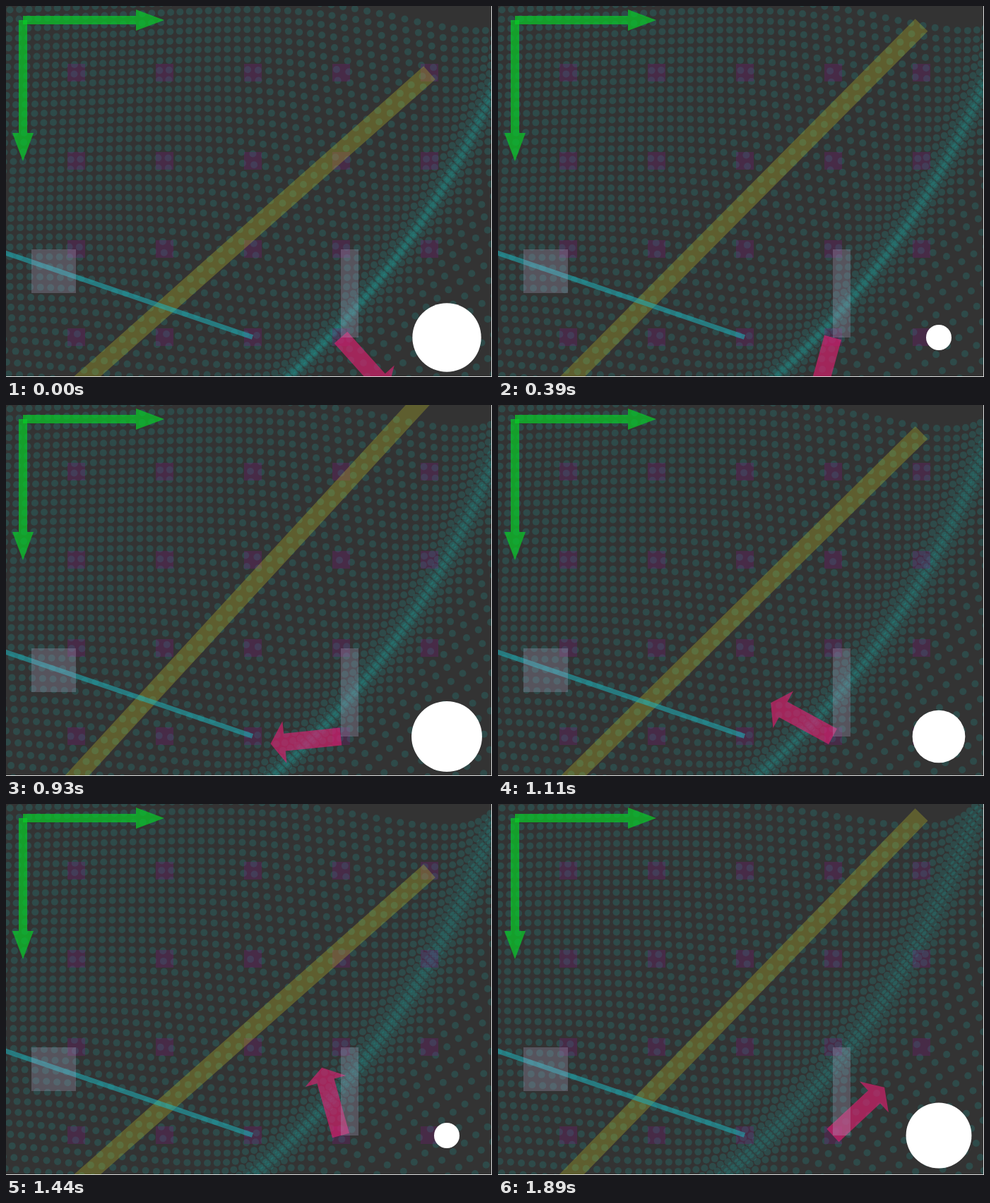
Animation of 688x526 px, one loop 1990 ms. Source, as an HTML page with a canvas:

```html
<!DOCTYPE html>
<html lang="en">
<head>
<meta charset="utf-8">
<title>Shapes over a waving dot field</title>
<style>
  html, body { margin: 0; width: 100%; height: 100%; overflow: hidden; background: #ddd; }
  canvas { display: block; }
</style>
</head>
<body>
<canvas id="stage" width="688" height="526"></canvas>
<script>
const ctx = document.getElementById('stage').getContext('2d');
const W = 687, H = 525, LOOP = 1990, TAU = Math.PI * 2;
const ORIGIN = { x: 24, y: 20 };
const UNIT = 125;

// Simulation clock of each step; steps appear on a 30 ms raster.
const clocks = Array.from({ length: 26 }, (_, i) =>
  i <= 18 ? 80 * i : i <= 22 ? 1440 + 68.5 * (i - 18) : 1714 + 54.2 * (i - 22));
const starts = clocks.map(c => Math.round(c / 30) * 30);

function rect(x, y, w, h, color) {
  ctx.fillStyle = color;
  ctx.fillRect(x, y, w, h);
}

function disc(x, y, r) {
  ctx.beginPath();
  ctx.arc(x, y, r, 0, TAU);
  ctx.fill();
}

function line(x1, y1, x2, y2, width, color) {
  ctx.strokeStyle = color;
  ctx.lineWidth = width;
  ctx.beginPath();
  ctx.moveTo(x1, y1);
  ctx.lineTo(x2, y2);
  ctx.stroke();
}

function arrow(x, y, angle, length, half, head, wing, color) {
  const neck = length - head;
  ctx.save();
  ctx.translate(x, y);
  ctx.rotate(angle);
  ctx.fillStyle = color;
  ctx.beginPath();
  ctx.moveTo(0, -half);
  ctx.lineTo(neck, -half);
  ctx.lineTo(neck, -wing);
  ctx.lineTo(length, 0);
  ctx.lineTo(neck, wing);
  ctx.lineTo(neck, half);
  ctx.lineTo(0, half);
  ctx.fill();
  ctx.restore();
}

// A square lattice pushed along the diagonal by a wave that grows
// and tightens with distance from a far corner.
function dotField(clock) {
  const u = clock / 1878;
  const front = 4.86 - 0.31 * u - 0.65 * u * u;
  const step = 14;
  ctx.fillStyle = 'rgba(25,190,185,0.17)';
  for (let y = 6; y < H + 60; y += step) {
    for (let x = 6 - 4 * step; x < W + 60; x += step) {
      const q = Math.hypot(x + 390, y + 340);
      const amp = Math.max(0, 0.0517 * (q - 517));
      const d = -amp * Math.sin(1.79e-5 * (q - 650) ** 2 - front);
      disc(x + d, y + d, 5);
    }
  }
}

function draw(clock) {
  ctx.clearRect(0, 0, 688, 526);
  ctx.save();
  ctx.beginPath();
  ctx.rect(0, 0, W, H);
  ctx.clip();
  rect(0, 0, W, H, '#333');

  dotField(clock);

  for (let row = 0; row < 4; row++) {
    for (let col = 0; col < 5; col++) {
      rect(87 + col * UNIT, 82 + row * UNIT, 25, 25, 'rgba(140,20,140,0.23)');
    }
  }

  const swing = (0.2514 * clock - 5.5) * Math.PI / 180;
  line(36.5, 595, 599.5, 32.5 + 62.5 * Math.cos(swing), 25, 'rgba(198,198,40,0.29)');
  line(-26, 341.5, 349, 469.5, 7, 'rgba(30,180,190,0.55)');

  arrow(474, 470, 0.84 + 0.0025 * clock, 100, 12.5, 20, 30, 'rgba(230,30,115,0.61)');

  const glass = 'rgba(180,175,205,0.27)';
  rect(36, 345, 63, 62, glass);
  rect(474, 345, 25, 125, glass);

  const green = 'rgba(8,208,40,0.69)';
  arrow(ORIGIN.x, ORIGIN.y, 0, 200, 6, 40, 15, green);
  arrow(ORIGIN.x, ORIGIN.y, Math.PI / 2, 200, 6, 40, 15, green);

  const pulse = (0.2125 * clock - 105.5) * Math.PI / 180;
  ctx.fillStyle = '#fff';
  disc(624, 470, 50 * Math.abs(Math.sin(pulse)) + 0.5);
  ctx.restore();
}

let shown = -1;
function tick() {
  const t = performance.now() % LOOP;
  const step = starts.findLastIndex(s => s <= t);
  if (step !== shown) draw(clocks[shown = step]);
  requestAnimationFrame(tick);
}
tick();
</script>
</body>
</html>
```
